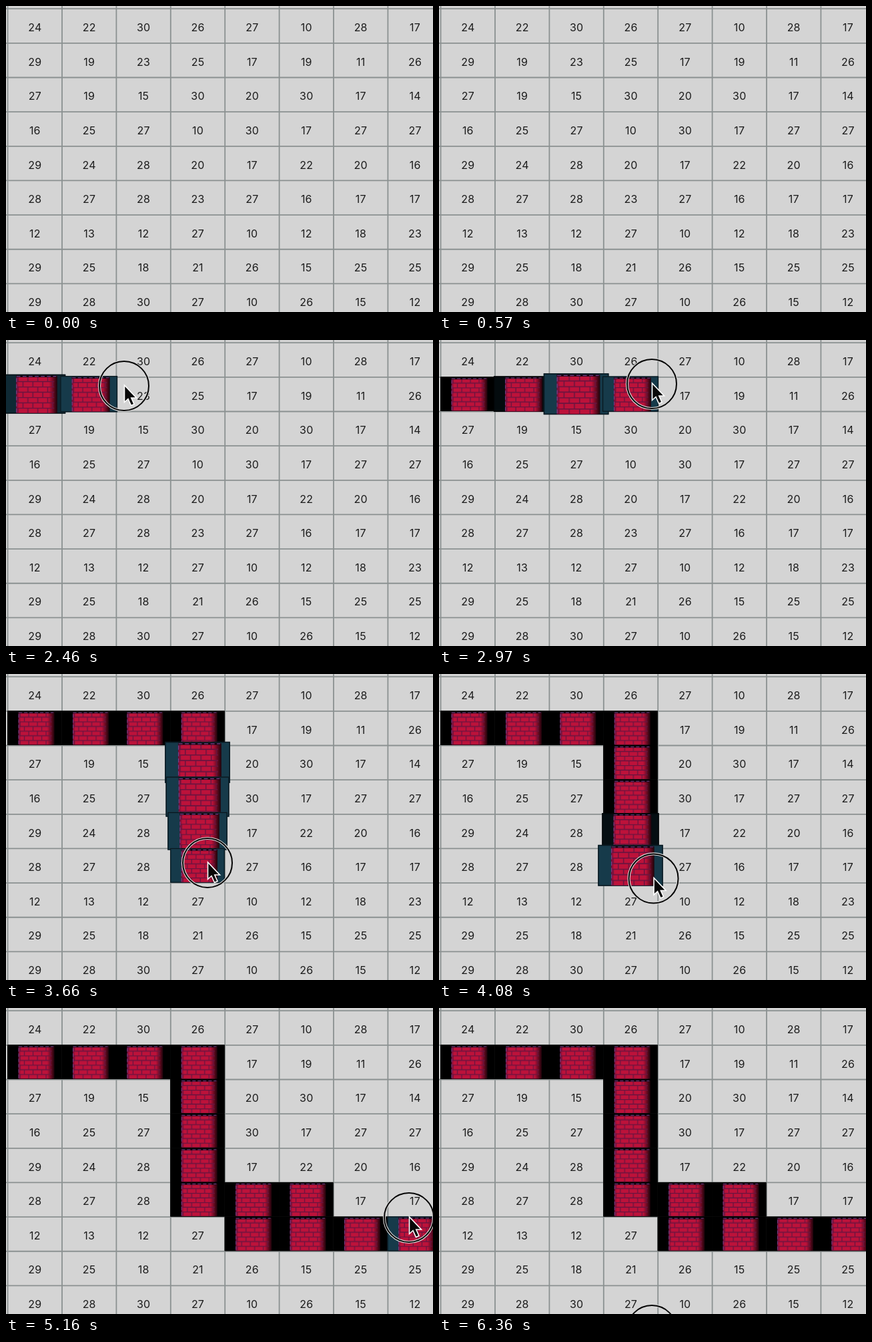
Write an HTML page that moves like this. It is 640 px wide and 460 px high and loops after 6.48 s.

```html
<!DOCTYPE html>
<html lang="en">
<head>
<meta charset="utf-8">
<title>Brick trail</title>
<style>
  html, body { margin: 0; width: 100%; height: 100%; overflow: hidden; background: #d4d4d4; }
  svg { display: block; }
  text { font: 16px Inter, "Liberation Sans", sans-serif; letter-spacing: .2px; fill: #1c1c1c; text-anchor: middle; }
</style>
</head>
<body>
<svg width="640" height="460" viewBox="0 0 640 460">
  <defs>
    <pattern id="courses" width="13" height="14" patternUnits="userSpaceOnUse" x="16" y="2">
      <path d="M0 .5H13M0 7.5H13M3 .5V7.5M9.5 7.5V14.5" fill="none" stroke="#68143f" stroke-width="1.3"/>
    </pattern>
    <linearGradient id="shade">
      <stop offset="0" stop-color="#6a0d38"/>
      <stop offset=".07" stop-color="#bd123a"/>
      <stop offset=".8" stop-color="#bd123a"/>
      <stop offset="1" stop-color="#1c030a"/>
    </linearGradient>
    <g id="bricks">
      <rect x="16.5" y="2" width="54" height="49" fill="url(#shade)"/>
      <rect x="16.5" y="2" width="50" height="49" fill="url(#courses)"/>
      <path d="M16.5 2.6H69" stroke="#14040f" stroke-width="2.4"/>
      <path d="M17 2.6H69M17 5V50" stroke="#75408a" stroke-width="1" stroke-dasharray="5 3"/>
    </g>
  </defs>
  <rect width="640" height="460" fill="#d4d4d4"/>
  <path id="grid" fill="none" stroke="#8b9191" stroke-width="1.8"/>
  <g id="numbers"></g>
  <g id="tiles"></g>
  <g id="cursor">
    <circle r="37" fill="none" stroke="#d6d6d6" stroke-width="4.2"/>
    <circle r="37" fill="none" stroke="#050505" stroke-width="2"/>
    <path d="M.5-1V24.5L6 19.5 10.5 29.5 15 27.5 10.8 18H18.5Z" fill="#080808" stroke="#fff" stroke-width="1.6"/>
  </g>
</svg>
<script>
const LOOP = 6480, STEP = 30;
const COLS = 8, ROWS = 9, LEFT = 2.6, TOP = 4.2, CELL_W = 81.4, CELL_H = 51.65;
const RISE = 500, FALL = 250, GROWTH = 0.2, LAG = 40, RELEASE = 5200;
const TEAL = [22, 58, 74];

const labels = `24 22 30 26 27 10 28 17 29 19 23 25 17 19 11 26 27 19 15 30 20 30 17 14
  16 25 27 10 30 17 27 27 29 24 28 20 17 22 20 16 28 27 28 23 27 16 17 17
  12 13 12 27 10 12 18 23 29 25 18 21 26 15 25 25 29 28 30 27 10 26 15 12`.split(/\s+/);

// turning points of the pointer: time, x, y
const route = [
  [1830, 47, 67], [2250, 84, 76], [2460, 177, 69], [2800, 247, 64], [2970, 319, 66],
  [3120, 321, 106], [3370, 312, 211], [3660, 302, 284], [4090, 322, 308],
  [4170, 420, 338], [4210, 450, 306], [4350, 491, 318], [4410, 567, 315],
  [5050, 571, 315], [5160, 604, 315], [5520, 600, 322], [5760, 464, 408], [6000, 402, 500]
];

const $ = id => document.getElementById(id);
const add = (parent, name, attrs = {}) => {
  const node = document.createElementNS("http://www.w3.org/2000/svg", name);
  for (const key in attrs) node.setAttribute(key, attrs[key]);
  return parent.appendChild(node);
};
const smooth = u => {
  const k = Math.min(1, Math.max(0, u));
  return k * k * (3 - 2 * k);
};
const cellX = col => LEFT + col * CELL_W;
const cellY = row => TOP + row * CELL_H;

function pointerAt(t) {
  if (t >= 6360) return [319, 484];
  const i = route.findIndex(point => point[0] > t);
  if (i < 1) return null;
  const [t0, x0, y0] = route[i - 1], [t1, x1, y1] = route[i];
  const u = (t - t0) / (t1 - t0);
  return [x0 + (x1 - x0) * u, y0 + (y1 - y0) * u];
}

// every cell the pointer passes before its release turns to brick
function findTiles() {
  const starts = new Map();
  for (let t = route[0][0]; t < RELEASE; t += 2) {
    const [x, y] = pointerAt(t);
    const index = Math.floor((y - TOP) / CELL_H) * COLS + Math.floor((x - LEFT) / CELL_W);
    if (!starts.has(index)) starts.set(index, t + LAG);
  }
  return [...starts].sort((a, b) => a[0] - b[0]).map(([index, start]) => {
    const group = add($("tiles"), "g");
    const back = add(group, "rect", { width: CELL_W, height: CELL_H });
    const edge = add(group, "rect", {
      x: 0.6, y: 0.6, width: CELL_W - 1.2, height: CELL_H - 1.2, fill: "none", "stroke-width": 1.2
    });
    add(group, "use", { href: "#bricks" });
    return { col: index % COLS, row: Math.floor(index / COLS), start, group, back, edge };
  });
}

function drawTile({ col, row, start, group, back, edge }, t) {
  const age = t - start;
  group.style.display = age < 0 ? "none" : "";
  if (age < 0) return;
  const glow = 1 - smooth((age - RISE) / FALL);
  const scale = 1 + GROWTH * smooth(age / RISE) * glow;
  const x = cellX(col) + CELL_W / 2 - 0.5, y = cellY(row) + CELL_H / 2 - 0.5;
  group.setAttribute("transform",
    `translate(${x} ${y}) scale(${scale}) translate(${-CELL_W / 2} ${-CELL_H / 2})`);
  const tint = share => `rgb(${TEAL.map(v => Math.round(v * share * glow))})`;
  back.setAttribute("fill", tint(1));
  edge.setAttribute("stroke", tint(0.4));
}

let lines = "";
for (let c = 0; c < COLS; c++) lines += `M${cellX(c)} 0V460`;
for (let r = 0; r < ROWS; r++) lines += `M0 ${cellY(r)}H640`;
$("grid").setAttribute("d", lines);

labels.forEach((label, i) => {
  const x = cellX(i % COLS) + CELL_W / 2, y = cellY(Math.floor(i / COLS)) + 33.7;
  add($("numbers"), "text", { x, y }).textContent = label;
});

const tiles = findTiles();

function draw(t) {
  tiles.forEach(tile => drawTile(tile, t));
  const at = pointerAt(t);
  $("cursor").style.display = at ? "" : "none";
  if (at) $("cursor").setAttribute("transform", `translate(${at})`);
}

const begin = performance.now();
function tick() {
  const t = (performance.now() - begin) % LOOP;
  draw(Math.floor(t / STEP) * STEP);
  requestAnimationFrame(tick);
}
tick();
</script>
</body>
</html>
```
